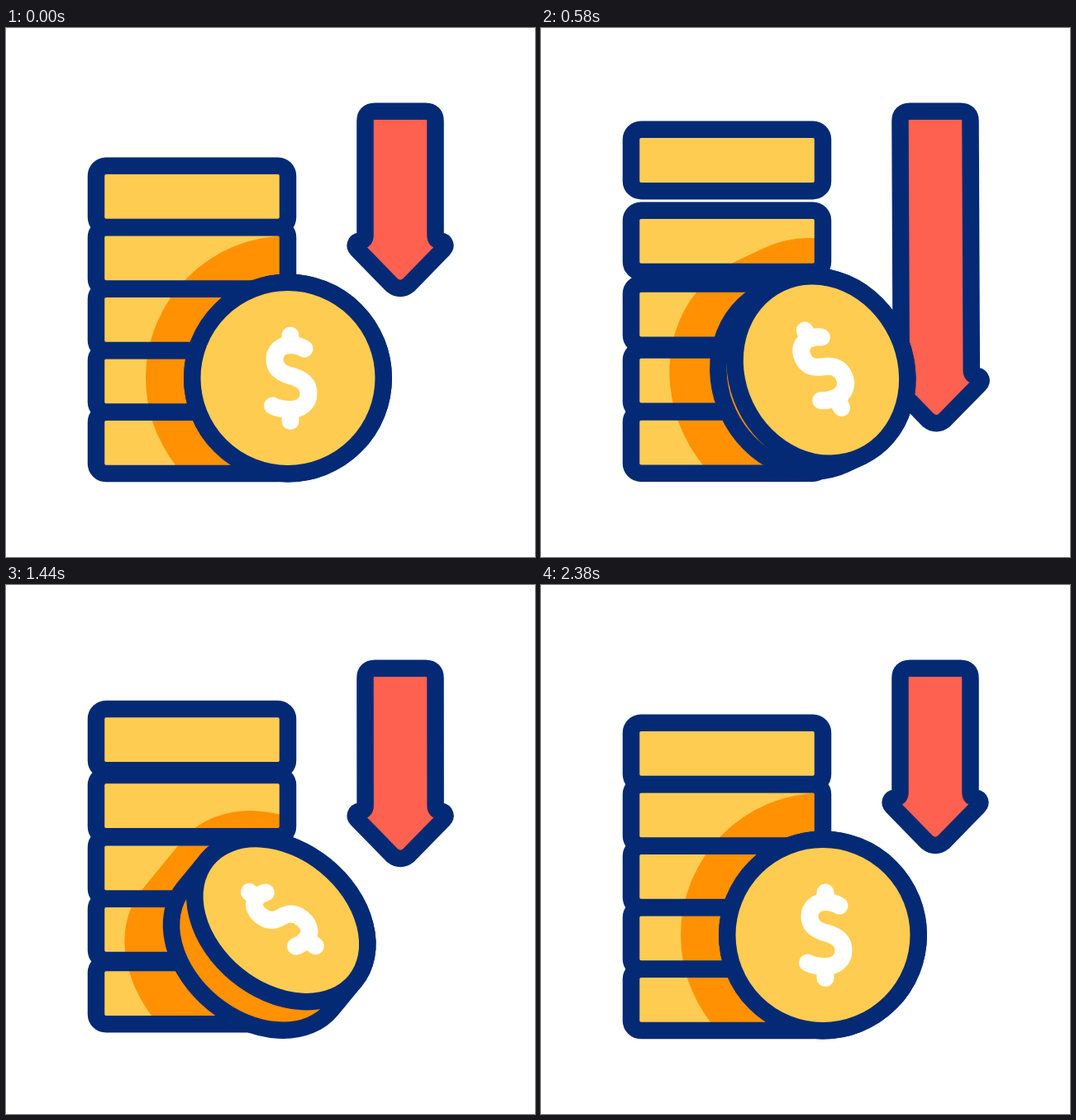
Animation of 640 by 640 pixels, one loop 2.4 s. Source, as an HTML page with a canvas:

```html
<!DOCTYPE html>
<html lang="en">
<head>
<meta charset="utf-8">
<title>Coins going down</title>
<style>
  html, body { margin: 0; width: 100%; height: 100%; overflow: hidden; background: #fff; }
  canvas { display: block; width: 640px; height: 640px; }
</style>
</head>
<body>
<canvas id="stage" width="640" height="640"></canvas>
<script>
const ctx = document.getElementById('stage').getContext('2d');
const LOOP = 2400, TAU = Math.PI * 2, LINE = 20.5;
const NAVY = '#042a75', GOLD = '#ffcc52', ORANGE = '#ff9102', RED = '#ff6150';

// Hops of the gap below each stacked coin, bottom coin first.
const HOPS = [
  { size: 30.5, span: 480, peaks: [232, 360, 408, 456, 504] },
  { size: 29, span: 730, peaks: [920, 985, 1050, 1115, 1180] },
  { size: 16, span: 560, peaks: [1582, 1647, 1712, 1777, 1842] }
];

// Arrow stretch: [time, pixels].
const STRETCH = [
  [0, 0], [340, -72], [610, 170], [910, -4], [1210, 89],
  [1540, -3], [1680, 0], [1900, 14], [2300, 0], [2400, 0]
];

const easeSine = x => (1 - Math.cos(Math.PI * x)) / 2;
const easeCubic = x => x < 0.5 ? 4 * x ** 3 : 1 - 4 * (1 - x) ** 3;

function track(keys, t) {
  const i = Math.max(1, keys.findIndex(k => k[0] > t));
  const [t0, v0] = keys[i - 1], [t1, v1] = keys[i];
  return v0 + (v1 - v0) * easeSine((t - t0) / (t1 - t0));
}

function gap(i, t) {
  return HOPS.reduce((sum, { size, span, peaks }) => {
    const x = (t - peaks[i]) / span;
    return Math.abs(x) < 0.5 ? sum + size * Math.cos(Math.PI * x) ** 2 : sum;
  }, 0);
}

// Geometry of the leaning coin; everything follows from one tilt value.
function coinPose(t) {
  const s = 0.508 * easeCubic(Math.min(1, t / 1170, (LOOP - t) / 1165));
  const angle = (90 - 102 * s) * Math.PI / 180;
  const squash = Math.sqrt(1 - s);
  return {
    x: 341 - 33 * s * s,
    y: 423.5 - 44 * s + 16 * s * s,
    angle, squash,
    ux: Math.cos(angle), uy: Math.sin(angle),
    depth: 90 * s,
    a: 115.75,
    b: 105.5 * squash + 10.25,
    shade: 172 - 37 * s
  };
}

// Outline of an ellipse swept backwards along its short axis.
function sweep({ x, y, angle, ux, uy }, a, b, depth) {
  const backX = x - uy * depth, backY = y + ux * depth;
  const p = new Path2D();
  p.ellipse(x, y, a, b, angle, Math.PI, TAU);
  p.lineTo(backX + ux * a, backY + uy * a);
  p.ellipse(backX, backY, a, b, angle, 0, Math.PI);
  p.closePath();
  return p;
}

function paint(fill, path) {
  ctx.fillStyle = fill;
  ctx.fill(path);
  ctx.stroke(path);
}

function drawStack(t, pose) {
  const { a, b, depth, shade } = pose;
  const ratio = (b + LINE / 2) / (a + LINE / 2);
  const shadow = sweep(pose, shade, shade * ratio, depth * 1.75);
  let lift = 0;
  for (let i = 0; i < 5; i++) {
    lift += gap(i, t);
    const body = new Path2D();
    body.roundRect(109, 464.8 - 74.5 * i - lift, 232, 74.3, 12);
    ctx.fillStyle = GOLD;
    ctx.fill(body);
    ctx.save();
    ctx.clip(body);
    ctx.fillStyle = ORANGE;
    ctx.fill(shadow);
    ctx.restore();
    ctx.stroke(body);
  }
}

function drawArrow(t) {
  const d = track(STRETCH, t), sway = Math.max(0, d) * 0.008;
  const p = new Path2D();
  const l = v => 477 - v + sway, r = v => 477 + v + sway;
  p.moveTo(446.5, 100.8);
  p.lineTo(507.5, 100.8);
  p.quadraticCurveTo(519.5, 100.8, 519.5, 112.8);
  p.lineTo(r(42.5), 251 + d);
  p.quadraticCurveTo(r(42.5), 257 + d, r(48), 257.5 + d);
  p.bezierCurveTo(r(55), 258.5 + d, r(56), 264 + d, r(52), 268 + d);
  p.lineTo(r(10), 311 + d);
  p.quadraticCurveTo(r(0), 319 + d, l(10), 311 + d);
  p.lineTo(l(52), 268 + d);
  p.bezierCurveTo(l(56), 264 + d, l(55), 258.5 + d, l(48), 257.5 + d);
  p.quadraticCurveTo(l(42.5), 257 + d, l(42.5), 251 + d);
  p.lineTo(434.5, 112.8);
  p.quadraticCurveTo(434.5, 100.8, 446.5, 100.8);
  p.closePath();
  paint(RED, p);
}

// Dollar sign relative to the centre of the coin face.
const DOLLAR = new Path2D(
  'M20 -35.5C15 -38.5 9 -40 3 -40C-9 -40 -16 -32.5 -16 -22.5' +
  'C-16 -10.5 -7 -5.5 4 -2.5S25 5.5 25 18.5C25 31 15 38 3 38' +
  'C-5 38 -12 37 -18.5 33.5M3 -51.5V-40M3 38V52');

function drawCoin(pose) {
  const { x, y, angle, ux, uy, squash, a, b, depth } = pose;
  paint(ORANGE, sweep(pose, a, b, depth));

  const face = new Path2D();
  face.ellipse(x, y, a, b, angle, 0, TAU);
  paint(GOLD, face);

  const sign = new Path2D();
  sign.addPath(DOLLAR, new DOMMatrix([squash * uy, -squash * ux, ux, uy, x, y]));
  ctx.save();
  ctx.strokeStyle = '#fff';
  ctx.lineWidth = 21;
  ctx.stroke(sign);
  ctx.restore();
}

function draw(t) {
  const pose = coinPose(t);
  ctx.fillStyle = '#fff';
  ctx.fillRect(0, 0, 640, 640);
  ctx.strokeStyle = NAVY;
  ctx.lineWidth = LINE;
  ctx.lineCap = ctx.lineJoin = 'round';
  drawStack(t, pose);
  drawArrow(t);
  drawCoin(pose);
}

const start = performance.now();
function tick() {
  draw((performance.now() - start) % LOOP);
  requestAnimationFrame(tick);
}
tick();
</script>
</body>
</html>
```
